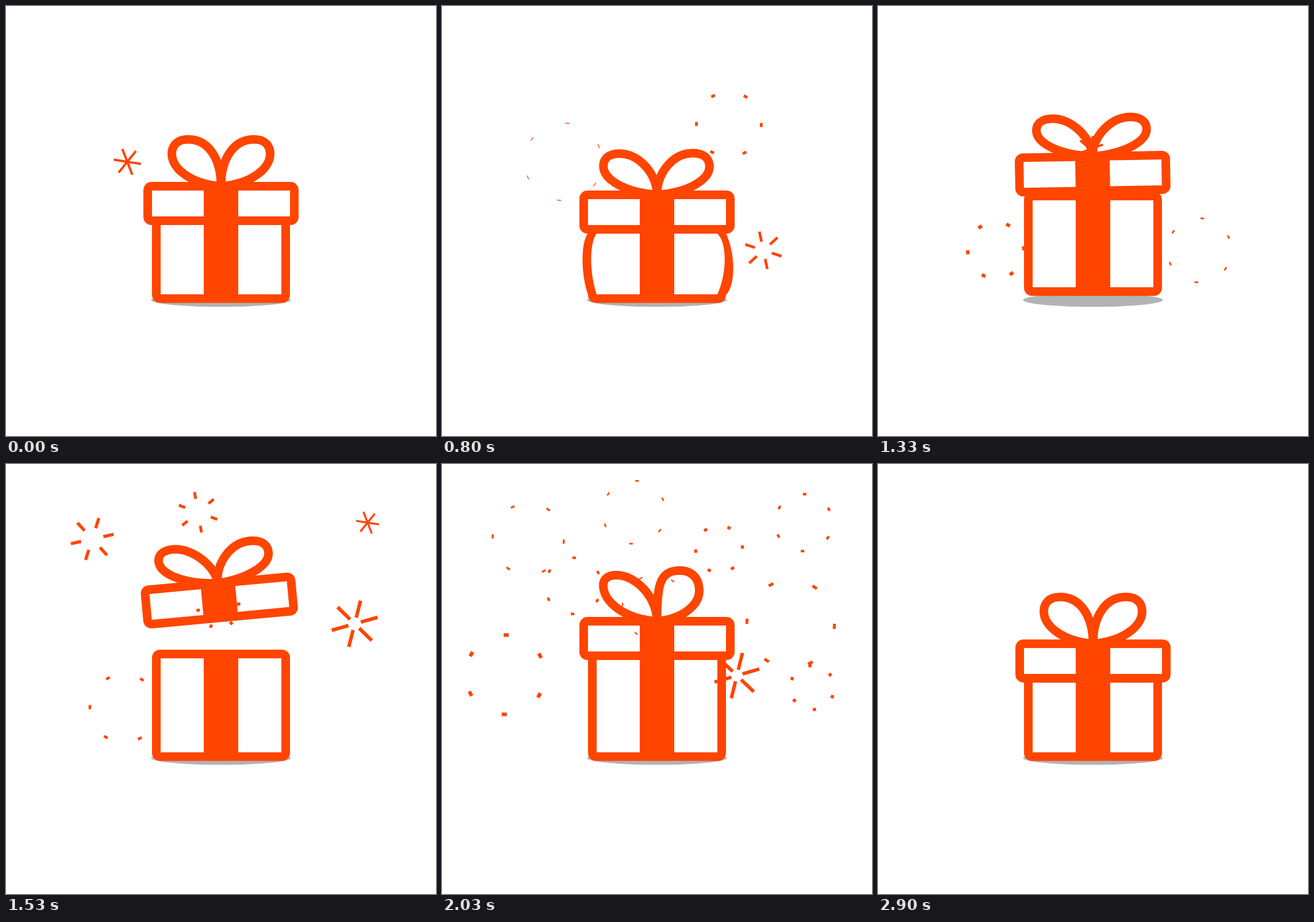
An HTML page with a canvas for the animation above (2930 ms loop, 748x748 px).

```html
<!DOCTYPE html>
<html lang="en">
<head>
<meta charset="utf-8">
<title>Gift</title>
<style>
  html, body { margin: 0; width: 100%; height: 100%; overflow: hidden; background: #fff; }
  canvas { display: block; width: 100vmin; height: 100vmin; }
</style>
</head>
<body>
<canvas id="stage" width="748" height="748"></canvas>
<script>
const ctx = document.getElementById('stage').getContext('2d');
const LOOP = 2930;
const ORANGE = '#ff4500', WHITE = '#fff', GREY = '#b3b3b3';
const LEFT = 254, RIGHT = 494, GROUND = 516.5, RIM = 15, CORNER = 14;
const REST_Y = 343.5, MIN_TOP = 323;

// Key poses: time, lid centre, lid tilt, bow flatness, bow sway
const POSES = [
  [0, REST_Y, 0, 0, 0],
  [800, 358.5, 0, 0.85, 0.1],
  [1200, 329, 1.2, 1.3, 0],
  [1530, 237.5, -5.3, 1.3, 0.3],
  [2030, 303.5, 0, -0.25, 1],
  [2530, 325.5, 0, 0.1, 0.2]
];

// Bursts: x, y, radius, start
const BURSTS = [
  [211, 271, 68, -195], [499, 206, 65, 110],
  [559, 425, 58, 455], [205, 425, 66, 795],
  [334, 84, 57, 1144], [369.5, 249, 57, 1100],
  [629, 102, 57, 1335], [150, 130.5, 65, 1174],
  [110, 366.5, 81, 1363], [606.5, 278, 82, 1234],
  [228.5, 212, 57, 1354], [482, 148, 57, 1520],
  [644, 389, 57, 1560], [513, 368, 82, 1742]
];

const clamp = v => Math.min(1, Math.max(0, v));
const radians = deg => deg * Math.PI / 180;

// Pose i with its time, counted on across loops
function key(i) {
  const n = POSES.length, lap = Math.floor(i / n);
  const [time, ...values] = POSES[i - lap * n];
  return { time: time + lap * LOOP, values };
}

// Smooth pose at time t, never overshooting the key poses
function poseAt(t) {
  const i = POSES.findLastIndex(p => p[0] <= t);
  const [p, a, b, q] = [i - 1, i, i + 1, i + 2].map(key);
  const span = b.time - a.time, u = (t - a.time) / span, v = 1 - u;
  return a.values.map((from, c) => {
    const slope = (k, l) => (l.values[c] - k.values[c]) / (l.time - k.time);
    const blend = (m, n) => m * n > 0 ? 2 * m * n / (m + n) : 0;
    const m0 = blend(slope(p, a), slope(a, b)) * span;
    const m1 = blend(slope(a, b), slope(b, q)) * span;
    return from * v * v * (1 + 2 * u) + b.values[c] * u * u * (3 - 2 * u)
      + m0 * u * v * v - m1 * u * u * v;
  });
}

function drawShadow() {
  ctx.fillStyle = GREY;
  ctx.beginPath();
  ctx.ellipse(374, 511.5, 121.5, 11.8, 0, 0, 2 * Math.PI);
  ctx.fill();
}

// Side wall from (x, y0) to (x, y1), pushed out by d
function wall(x, y0, y1, d) {
  const h = y1 - y0;
  ctx.bezierCurveTo(x + d, y0 + h * 0.15, x + d, y0 + h * 0.65, x, y1);
}

// The body hangs on the lid until it is fully stretched, and bulges when pressed
function drawBody(t, lidY) {
  const hop = 19.5 * Math.sin(Math.PI * clamp((t - 1080) / 320));
  const top = Math.max(MIN_TOP, lidY + 22.5), bottom = GROUND - hop;
  const bulge = Math.max(0, lidY - REST_Y) / 15, dl = -12.7 * bulge, dr = 17 * bulge;
  const y0 = top + CORNER, y1 = bottom - CORNER;
  ctx.fillStyle = ORANGE;
  ctx.beginPath();
  ctx.moveTo(LEFT, y0);
  wall(LEFT, y0, y1, dl);
  ctx.arcTo(LEFT, bottom, LEFT + CORNER, bottom, CORNER);
  ctx.lineTo(RIGHT - CORNER, bottom);
  ctx.arcTo(RIGHT, bottom, RIGHT, y1, CORNER);
  wall(RIGHT, y1, y0, dr);
  ctx.arcTo(RIGHT, top, RIGHT - CORNER, top, CORNER);
  ctx.lineTo(LEFT + CORNER, top);
  ctx.arcTo(LEFT, top, LEFT, y0, CORNER);
  ctx.fill();

  ctx.fillStyle = WHITE;
  for (const [edge, ribbon, d] of [[LEFT + RIM, 344, dl], [RIGHT - RIM, 404, dr]]) {
    ctx.beginPath();
    ctx.moveTo(ribbon, top + RIM);
    ctx.lineTo(edge, top + RIM);
    wall(edge, top + RIM, bottom - RIM, d);
    ctx.lineTo(ribbon, bottom - RIM);
    ctx.fill();
  }
}

// One loop of the bow; lean > 0 tips it outwards, lean < 0 upright
function drawLoop(side, flat, lean) {
  const w = 85.5 + 8 * flat + 10 * lean;
  const h = 81.5 - 11 * flat - 4 * lean;
  const peak = 57 + 8 * flat + 16 * lean;
  const belly = 0.69 + 0.09 * lean;
  ctx.save();
  ctx.scale(side, -1);
  ctx.beginPath();
  ctx.moveTo(0, 0);
  ctx.bezierCurveTo(0, 48 - 13 * flat - 10 * lean, peak - 35, h, peak, h);
  ctx.bezierCurveTo(peak + (w - peak) * 0.74, h, w, h * (1 + belly) / 2, w, h * belly);
  ctx.bezierCurveTo(w, h * belly * 0.54, w * 0.61, 4, 0, 0);
  ctx.stroke();
  ctx.restore();
}

function drawLid(y, tilt, flat, sway) {
  ctx.save();
  ctx.translate(374 + 0.55 * tilt, y);
  ctx.rotate(radians(tilt));

  ctx.save();
  ctx.translate(0, -30);
  ctx.strokeStyle = ORANGE;
  ctx.lineWidth = RIM;
  for (const side of [-1, 1]) drawLoop(side, flat, -side * sway);
  ctx.restore();

  ctx.fillStyle = ORANGE;
  ctx.beginPath();
  ctx.roundRect(-135, -37.5, 270, 75, CORNER);
  ctx.fill();
  ctx.fillStyle = WHITE;
  for (const x of [-120, 30]) ctx.fillRect(x, -22.5, 90, 45);
  ctx.restore();
}

// Six rays fly out, slow down, shrink to flecks and thin away within a second
function drawBurst([x, y, radius, start], i, t) {
  const age = (t - start) / 1000;
  if (age < 0.19 || age > 1) return;
  const grow = 1 - (1 - age) ** 2;
  const ray = Math.min(0.37, Math.max(0.37 - 2.4 * (age - 0.32), 0.13 * Math.sqrt(1.02 - age)));
  const outer = radius * grow, inner = Math.max(0, outer - radius * ray);
  const endAngle = i % 2 ? 5 : 36;
  ctx.save();
  ctx.translate(x, y);
  ctx.rotate(radians(endAngle - 42 * (1 - grow)));
  ctx.strokeStyle = ORANGE;
  ctx.lineWidth = radius * 0.11 * (0.3 + 0.7 * clamp(age / 0.55));
  ctx.beginPath();
  for (let n = 0; n < 6; n++) {
    ctx.moveTo(inner, 0);
    ctx.lineTo(outer, 0);
    ctx.rotate(Math.PI / 3);
  }
  ctx.stroke();
  ctx.restore();
}

function draw() {
  const t = performance.now() % LOOP;
  const pose = poseAt(t);
  ctx.fillStyle = WHITE;
  ctx.fillRect(0, 0, 748, 748);
  drawShadow();
  drawBody(t, pose[0]);
  drawLid(...pose);
  BURSTS.forEach((burst, i) => drawBurst(burst, i, t));
  requestAnimationFrame(draw);
}
draw();
</script>
</body>
</html>
```
